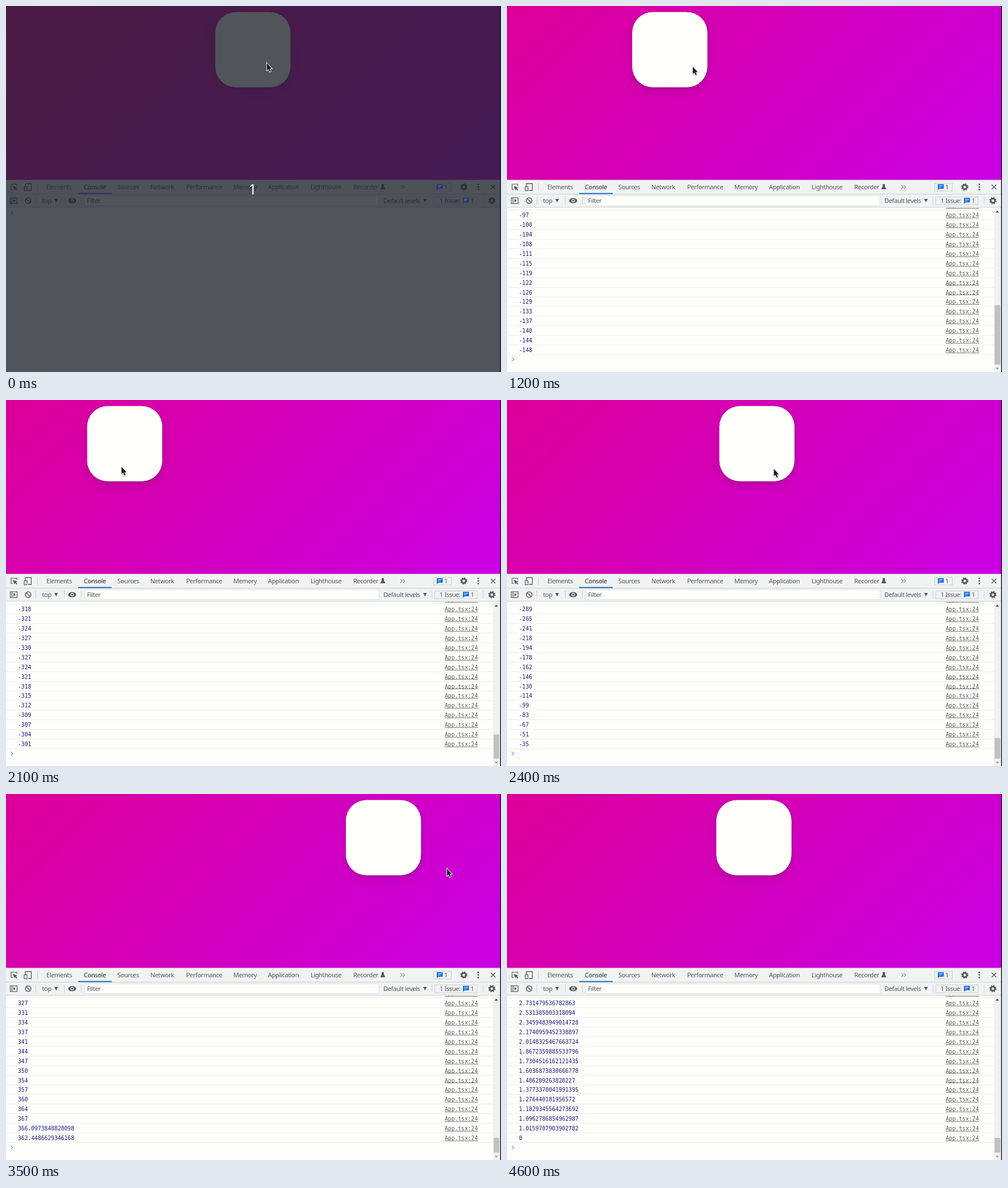
Animation of 871 by 643 pixels, one loop 5100 ms. Source, as an HTML page with a canvas:

```html
<!DOCTYPE html>
<html lang="en">
<head>
<meta charset="utf-8">
<title>Drag and spring back</title>
<style>
html, body { margin: 0; width: 100%; height: 100%; overflow: hidden; background: #fefffb; }
canvas { display: block; }
</style>
</head>
<body>
<canvas id="stage" width="871" height="643"></canvas>
<script>
const ctx = document.getElementById('stage').getContext('2d');
const LOOP = 5100, STEP = 100, DRAG_START = 700, RELEASE = 3500, POINTER_EXIT = 3800;
const SCALE = 0.88, ROW = 16.93, TOP = 354, BOX_LEAD = 5, RELEASE_ROW = 181;
const UI = '"Noto Sans", "Open Sans", sans-serif';
const MONO = '"DejaVu Sans Mono", monospace';
const INK = '#55595d', BAR = '#f0f3f2', LINE = '#cdd0d3';

// Turning points of the drag as [log row, offset], and of the log as [time, rows].
const DRAG = [[1, -4], [6, -17], [76, -271], [95, -330], [109, -289], [113, -194],
  [123, -35], [128, 6], [141, 202], [155, 281], [RELEASE_ROW, 367]];
const ROW_COUNT = [[DRAG_START, 1], [1600, 76], [2400, 123], [3460, RELEASE_ROW], [4600, 263]];

// Piecewise linear track through [position, value] pairs.
function track(keys, p) {
  const i = keys.findIndex(([at]) => at >= p);
  if (i <= 0) return keys[i < 0 ? keys.length - 1 : 0][1];
  const [p0, a] = keys[i - 1], [p1, b] = keys[i];
  return a + (b - a) * (p - p0) / (p1 - p0);
}

// Overdamped return to rest: a slow and a fast exponential, cut off below one pixel.
function spring(k) {
  const value = 225.27 * 0.926745 ** k * (1 - 0.0064 * 0.69 ** k);
  return value < 1 ? 0 : value;
}

const offsetAt = row => row <= RELEASE_ROW ? track(DRAG, row) : spring(row - RELEASE_ROW - 10);
const logLabel = row => String(row <= RELEASE_ROW ? Math.round(offsetAt(row)) : offsetAt(row));

function rect(x, y, w, h, color) {
  ctx.fillStyle = color;
  ctx.fillRect(x, y, w, h);
}
function text(s, x, y, color = INK, font = '11px ' + UI, spacing = '-0.35px') {
  ctx.font = font;
  ctx.letterSpacing = spacing;
  ctx.fillStyle = color;
  ctx.fillText(s, x, y);
}
function poly(points, close) {
  ctx.beginPath();
  points.forEach(([x, y]) => ctx.lineTo(x, y));
  if (close) ctx.closePath();
}
function fillPoly(color, ...points) {
  poly(points, true);
  ctx.fillStyle = color;
  ctx.fill();
}
function line(color, width, ...points) {
  poly(points, false);
  ctx.strokeStyle = color;
  ctx.lineWidth = width;
  ctx.stroke();
}
function disc(x, y, r, color) {
  ctx.beginPath();
  ctx.arc(x, y, r, 0, 7);
  ctx.fillStyle = color;
  ctx.fill();
}
function ring(x, y, r, width, dash = []) {
  ctx.beginPath();
  ctx.arc(x, y, r, 0, Math.PI * 2);
  ctx.strokeStyle = INK;
  ctx.lineWidth = width;
  ctx.setLineDash(dash);
  ctx.stroke();
  ctx.setLineDash([]);
}
function frame(x, y, w, h, color, width = 1) {
  ctx.strokeStyle = color;
  ctx.lineWidth = width;
  ctx.strokeRect(x, y, w, h);
}
function triangle(x, y, w, h, color = INK) {
  fillPoly(color, [x - w / 2, y], [x + w / 2, y], [x, y + h]);
}
function chevron(x, y, color, width = 1) {
  line(color, width, [x, y - 3], [x + 3.5, y], [x, y + 3]);
}
function gear(x, y) {
  ring(x, y, 3.6, 2.6);
  ring(x, y, 5.3, 1.8, [2.4, 1.76]);
}

function drawPage() {
  const g = ctx.createLinearGradient(141, -141, 729, 447);
  g.addColorStop(0, '#dc0097');
  g.addColorStop(1, '#c900e4');
  rect(0, 0, 870, 306, g);
}

function drawBox(x) {
  ctx.beginPath();
  ctx.roundRect(x, 10.8, 132, 132, 36);
  ctx.fillStyle = '#fffffc';
  ctx.shadowColor = 'rgba(0,0,0,.13)';
  ctx.shadowBlur = 16;
  ctx.shadowOffsetY = 7;
  ctx.fill();
  ctx.shadowColor = 'rgba(0,0,0,.3)';
  ctx.shadowBlur = 2;
  ctx.shadowOffsetX = ctx.shadowOffsetY = 0.7;
  ctx.fill();
  ctx.shadowColor = 'transparent';
  ctx.shadowOffsetX = 0;
}

function drawAccents(color, underline) {
  rect(127, 328.5, 59, 2, underline);
  for (const [x, y] of [[758, 313], [804, 337]]) {
    rect(x, y, 10.5, 8, color);
    fillPoly(color, [x, y + 7], [x + 4, y + 7], [x, y + 10.5]);
    rect(x + 2, y + 2, 6.5, 1, '#dfe9fa');
    rect(x + 2, y + 4.5, 4.5, 1, '#dfe9fa');
  }
}

function drawTabs() {
  rect(0, 305.5, 870, 48.5, BAR);
  rect(0, 330, 870, 1, LINE);
  rect(0, 353, 870, 1, LINE);

  line(INK, 1.2, [12, 322.5], [9, 322.5], [9, 313], [19, 313], [19, 316]);
  fillPoly(INK, [12, 316], [20, 319], [17.3, 320.3], [20, 323], [18.6, 324.3], [16, 321.6], [14.7, 324]);
  line(INK, 1.3, [34, 317], [34, 312], [44.5, 312], [44.5, 324], [39, 324]);
  frame(32, 317.5, 5, 7, INK, 1.2);
  rect(55, 311, 1, 14, LINE);

  const tabs = { Elements: 71, Console: 137, Sources: 196, Network: 254, Performance: 317,
    Memory: 400, Application: 461, Lighthouse: 536, Recorder: 611 };
  for (const [name, x] of Object.entries(tabs)) {
    text(name, x, 321.5, name === 'Console' ? '#2c3033' : INK);
  }
  fillPoly(INK, [661, 313], [665, 313], [665, 317], [667.5, 322], [658.5, 322], [661, 317]);
  for (const x of [694, 698]) chevron(x, 318, INK);

  frame(752.5, 311.5, 31, 13.5, LINE);
  text('1', 771, 321.8);
  gear(805.5, 318);
  for (const y of [313.5, 318, 322.5]) disc(831, y, 1.4, INK);
  line(INK, 1.5, [853, 314], [861, 322]);
  line(INK, 1.5, [861, 314], [853, 322]);
}

function drawToolbar() {
  frame(7.5, 337, 12, 10, INK, 1.2);
  line(INK, 1.2, [10.5, 337], [10.5, 347]);
  fillPoly(INK, [13, 339], [17, 342], [13, 345]);
  ring(39, 342, 5, 1.4);
  line(INK, 1.4, [35.5, 338.5], [42.5, 345.5]);
  for (const x of [52, 102, 132, 749, 839]) rect(x, 335, 1, 14, LINE);
  text('top', 63.5, 345.8);
  triangle(88.2, 339, 6.5, 6);

  ctx.beginPath();
  ctx.ellipse(116.5, 342, 7, 4.5, 0, 0, 7);
  ctx.fillStyle = INK;
  ctx.fill();
  disc(116.5, 342, 3, BAR);
  disc(116.5, 342, 1.8, INK);

  rect(138, 333, 519, 18, '#fefffb');
  frame(138.5, 333.5, 518, 17, '#dfe2e2');
  text('Filter', 142.5, 345.8);
  text('Default levels', 664, 345.8);
  triangle(737.2, 339, 6.5, 6);
  frame(754.5, 335.5, 74.5, 13.5, LINE);
  text('1 Issue:', 763, 345.8);
  text('1', 817.5, 345.8);
  gear(855, 342);
}

function drawScrollbar(count) {
  const height = Math.max(26, 263 * 289 / ((count + 1) * ROW));
  rect(857, TOP, 12, 289, '#f1f2f0');
  rect(858, 630 - height, 10, height, '#c0c1c0');
  triangle(862.7, 363, 6.5, -3.5, '#4d4f50');
  triangle(862.7, 635.5, 6.5, 3.5, '#a2a4a3');
}

function drawConsole(count) {
  rect(0, TOP, 870, 289, '#fefffb');
  const pinnedY = 604.5 - ROW * (count - 1);
  const scrolled = pinnedY < 363;
  const firstY = scrolled ? pinnedY : 363;
  const right = scrolled ? 857 : 870;
  const linkX = right - 85;
  const font = 11 * SCALE + 'px ' + MONO;

  ctx.save();
  ctx.beginPath();
  ctx.rect(0, TOP, 870, 289);
  ctx.clip();
  for (let row = Math.max(1, count - 16); row <= count; row++) {
    const y = firstY + (row - 1) * ROW;
    text(logLabel(row), 21, y + 3.6, '#21177f', font, '0px');
    text('App.tsx:24', linkX, y + 3.6, '#5c5c60', font, '0px');
    rect(linkX, Math.round(y + 4.5), 58.5, 1, '#77777a');
    rect(0, Math.round(y + 7.6), right, 1, '#ecefec');
  }
  chevron(8.5, firstY + count * ROW - 0.2, '#6c9fd6', 1.2);
  ctx.restore();
  if (scrolled) drawScrollbar(count);
}

function drawPointer(x, y) {
  ctx.save();
  ctx.translate(x, y);
  poly([[0, 0], [0, 13], [2.9, 10.5], [4.8, 15.2], [7, 14.3], [5, 9.8], [8.6, 9.5]], true);
  ctx.shadowColor = 'rgba(0,0,0,.3)';
  ctx.shadowBlur = 2;
  ctx.shadowOffsetY = 1;
  ctx.lineWidth = 1.8;
  ctx.strokeStyle = '#fff';
  ctx.stroke();
  ctx.shadowColor = 'transparent';
  ctx.fillStyle = '#1c1c1e';
  ctx.fill();
  ctx.restore();
}

function pointerAt(t, row) {
  const start = DRAG_START, rise = Math.max(0, t - start) / 2300;
  if (t >= RELEASE) {
    const p = ((t - RELEASE) / (POINTER_EXIT - RELEASE)) ** 1.85;
    return [776 - 631 * p, 131 - 126 * p];
  }
  const lead = 5.4 * Math.exp(-(((t - 2400) / 400) ** 2));
  return [459 + (t < start ? 0 : SCALE * offsetAt(row + lead)), 100.3 + 28 * rise];
}

function drawCountdown() {
  rect(0, 0, 871, 643, 'rgba(32,36,45,.775)');
  ctx.globalAlpha = 0.35;
  drawAccents('#3d34b4', '#303a9c');
  ctx.globalAlpha = 1;
  ctx.textAlign = 'center';
  text('1', 434, 331, '#fff', '25px ' + UI, '0px');
  ctx.textAlign = 'left';
}

function render(now) {
  const t = Math.floor((now % LOOP) / STEP) * STEP;
  const dragging = t >= DRAG_START;
  const row = dragging ? track(ROW_COUNT, t) : 0;

  drawPage();
  drawBox(368.5 + (dragging ? SCALE * offsetAt(row + BOX_LEAD) : 0));
  drawTabs();
  drawToolbar();
  drawAccents('#1b6fdb', '#1b74b8');
  drawConsole(Math.floor(row));
  rect(869.5, 0, 1.5, 643, '#21172f');
  if (t < STEP) drawCountdown();
  if (t <= POINTER_EXIT) drawPointer(...pointerAt(t, row));
}

const started = performance.now();
function tick() {
  render(performance.now() - started);
  requestAnimationFrame(tick);
}
tick();
</script>
</body>
</html>
```
